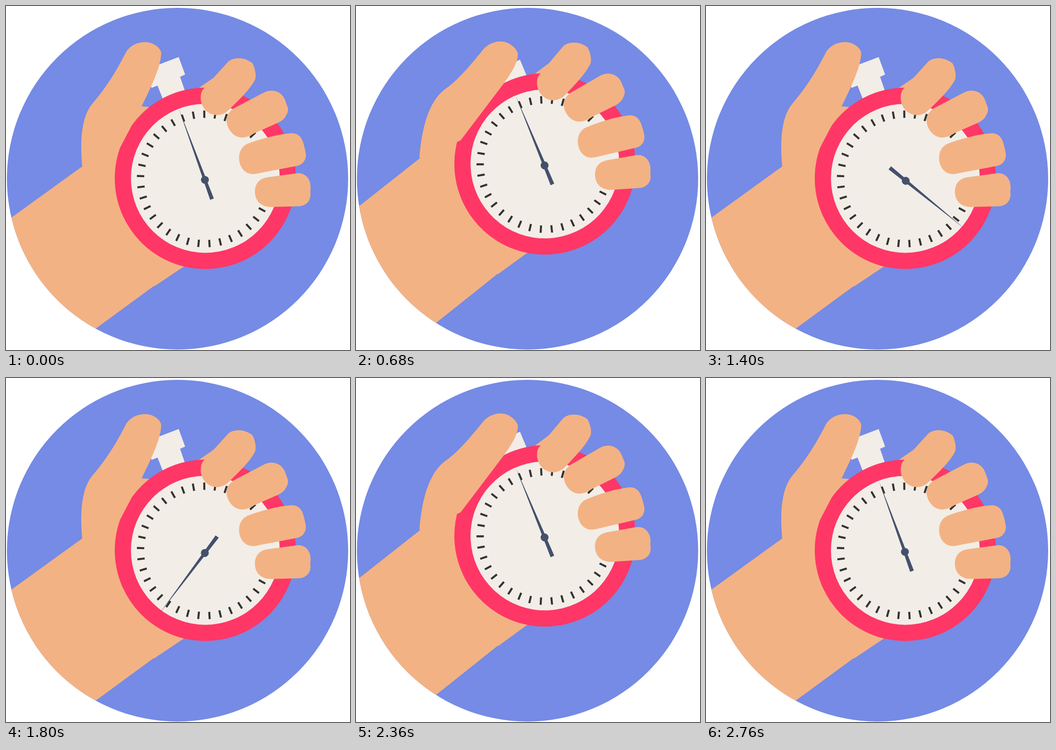
Recreate the animation shown at these times as an HTML page. Size 749 px wide and 748 px high, loop 3 s.

```html
<!DOCTYPE html>
<html lang="en">
<head>
<meta charset="utf-8">
<title>Stopwatch</title>
<style>
  html, body { margin: 0; width: 100%; height: 100%; overflow: hidden; background: #fff; }
  svg { display: block; width: 100vw; height: 100vh; }
  .skin { fill: #f3b283; }
  .cream { fill: #f2ede7; }
  .navy { fill: #43516c; }
</style>
</head>
<body>
<svg viewBox="0 0 749 748">
  <clipPath id="disc"><circle cx="373.5" cy="375.5" r="371.5"/></clipPath>
  <circle cx="373.5" cy="375.5" r="371.5" fill="#758be5"/>
  <g clip-path="url(#disc)">
    <g id="arm">
      <path class="skin" d="M-100 541L12 460L156 356L167 348.5L200 300L240 240L262 223.5C275 218 295 217.5 313 220L400 260L450 526L388 566L323 609.5L321 609.5L196 701L46 810Z"/>
      <path class="skin" d="M412 184L420 178L452 156L475 185Z"/>
      <path id="button" class="cream" d="M302 139L376 111L390 149L379 154L389 183L394 198L346 214L330 173L317 178Z"/>
      <circle cx="434" cy="374.7" r="197.2" fill="#ff3766"/>
      <circle class="cream" cx="434" cy="374.7" r="162"/>
      <path id="ticks" stroke="#333331" stroke-width="4.4"/>
      <g id="needle" class="navy">
        <path d="M376.3 223.5L452.5 418.5L444.5 421.5Z"/>
        <circle cx="433.1" cy="378" r="8.6"/>
      </g>
      <g class="skin">
        <path d="M432 178C440 171 446 163 452 156L482 123C492 111 518 109 537 125C541 133 545 146 543 158C536 176 510 202 487 224C477 235 465 238 456 237C437 235 424 218 424 200C424 190 426 184 432 178Z"/>
        <path d="M497 222L562 188C580 179 600 186 607 203L613 219Q616 227 611 236Q606 248 592 254L540 277C530 284 520 286 513 286C495 285 481 268 480 248C480 238 487 228 497 222Z"/>
        <path d="M530 298C555 289 590 279 618 277C636 275 644 285 648 300C651 311 653 320 653 326C651 340 643 346 632 348L553 363C545 365 538 366 533 365C518 363 507 348 507.5 329C508 313 517 302 530 298Z"/>
        <path d="M572 372L632 364C650 361 662 375 663 390C664 397 662 400 663 410C663 425 652 435 637 435.5L577 437C556 437 542 424 542 404C542 385 553 374 572 372Z"/>
      </g>
    </g>
    <path id="thumb" class="skin"/>
  </g>
</svg>
<script>
const LOOP = 3000, STEP = 40, REPEAT = 1680;
const el = id => document.getElementById(id);
const clamp = (v, a, b) => Math.min(b, Math.max(a, v));
const ease = x => x * x * (3 - 2 * x);

// Arm angle in degrees around the elbow
const swing = [[240, 0], [400, 2.08], [720, -2.54], [1080, 0]];
const OPEN = 1.757, PRESS = -2.34;

// Thumb outlines: start, five cubic curves, two corners
const thumbs = {
  open: [185, 365, 172, 320, 168, 262, 188, 229, 207, 198, 222, 158, 232, 120,
    238, 97, 258, 81, 279, 81, 293, 81, 306, 86, 310.5, 97,
    314, 128, 298, 189, 283, 244, 258, 330, 240, 340],
  rest: [166, 350, 161, 296, 163, 240, 190, 210, 220, 175, 242, 138, 260, 103,
    268, 87, 285, 78.5, 303, 78.5, 319, 78.5, 334, 88, 338, 101,
    338, 132, 314, 180, 295, 219, 249, 307, 236, 318],
  press: [138, 331, 143, 262, 160, 205, 195, 180, 224, 160, 252, 125, 275, 97,
    284, 85, 299, 77, 315, 77, 331, 77, 347, 88, 352.5, 103,
    353, 125, 336, 148, 322, 168, 228, 292, 212, 299]
};

function armAngle(t) {
  const c = t < REPEAT ? t : t - REPEAT;
  for (let i = 1; i < swing.length; i++) {
    const [t0, a] = swing[i - 1], [t1, b] = swing[i];
    if (c < t1) return a + (b - a) * ease(clamp((c - t0) / (t1 - t0), 0, 1));
  }
  return 0;
}

// Smooth blend through the three thumb poses
function thumbPath(a) {
  const wo = a * (a - PRESS) / (OPEN * (OPEN - PRESS));
  const wp = a * (a - OPEN) / (PRESS * (PRESS - OPEN));
  const wr = 1 - wo - wp;
  const p = thumbs.rest.map((v, i) =>
    (v * wr + thumbs.open[i] * wo + thumbs.press[i] * wp).toFixed(2));
  return `M${p.slice(0, 2)}C${p.slice(2, 32)}L${p.slice(32)}Z`;
}

function tickPath() {
  let d = "";
  for (let i = -25; i <= 8; i++) {
    const a = (-0.8 + i * 9.63) * Math.PI / 180;
    const at = r => `${433.7 + r * Math.sin(a)} ${376 - r * Math.cos(a)}`;
    d += `M${at(132.8)}L${at(148.8)}`;
  }
  return d;
}

function draw(now) {
  const t = Math.floor(now % LOOP / STEP) * STEP;
  const a = armAngle(t);
  const push = clamp(a / PRESS, 0, 1);
  const turn = 360 * clamp((t - 720) / 1640, 0, 1);
  el("arm").setAttribute("transform", `rotate(${a} -344 913)`);
  el("button").setAttribute("transform", `translate(${13 * push} ${35 * push})`);
  el("needle").setAttribute("transform", `rotate(${turn} 433.7 379.3)`);
  el("thumb").setAttribute("d", thumbPath(a));
}

el("ticks").setAttribute("d", tickPath());
const start = performance.now();
function frame() {
  draw(performance.now() - start);
  requestAnimationFrame(frame);
}
frame();
</script>
</body>
</html>
```
